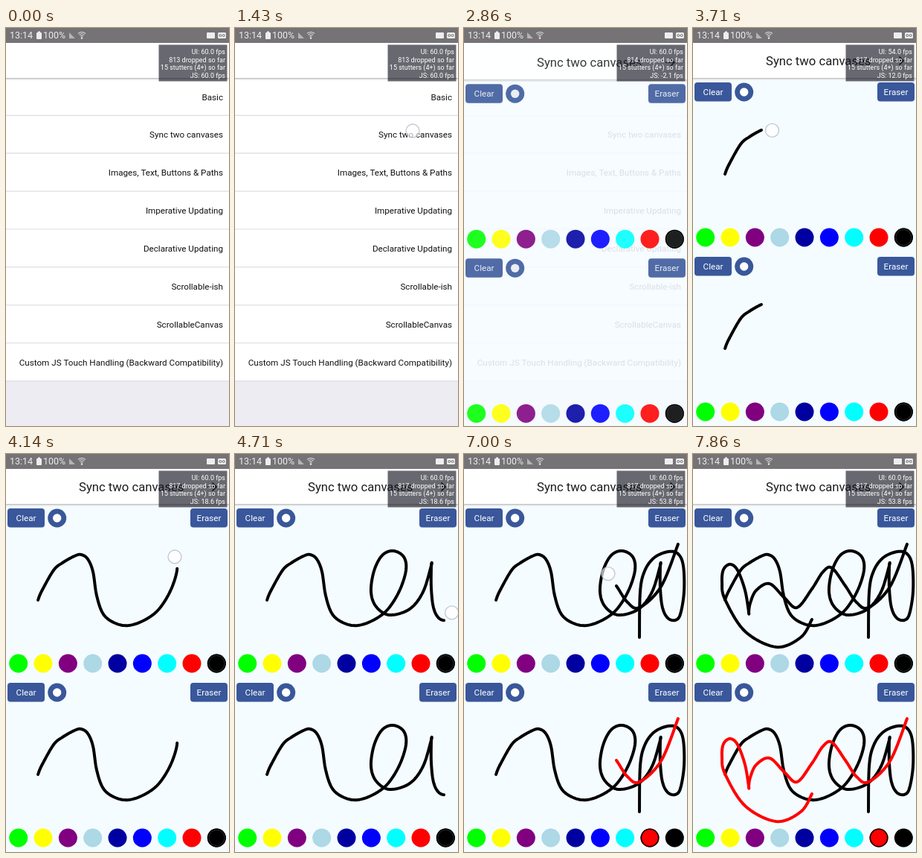
An HTML page with a canvas that plays this animation: 300x534 px, repeating every 8 s.

```html
<!DOCTYPE html>
<html lang="en">
<head>
<meta charset="utf-8">
<title>Sync two canvases</title>
<style>
  html, body { margin: 0; width: 100%; height: 100%; overflow: hidden; background: #fff; }
  canvas { display: block; width: 300px; height: 534px; }
</style>
</head>
<body>
<canvas id="stage"></canvas>
<script>
const W = 300, H = 534, LOOP = 8000, STEP = LOOP / 56, PANE = 234;
const canvas = document.getElementById('stage');
const ratio = window.devicePixelRatio || 1;
canvas.width = W * ratio;
canvas.height = H * ratio;
const ctx = canvas.getContext('2d');
ctx.scale(ratio, ratio);

const ROWS = ['Basic', 'Sync two canvases', 'Images, Text, Buttons & Paths', 'Imperative Updating',
  'Declarative Updating', 'Scrollable-ish', 'ScrollableCanvas',
  'Custom JS Touch Handling (Backward Compatibility)'];
const COLORS = ['#00ff00', '#ffff00', '#800080', '#add8e6', '#0000a0', '#0000ff', '#00ffff', '#ff0000', '#000000'];
const RED = 7, BLACK = 8;

// Repeated points make sharp corners.
const scribble = makeStroke(3575, 1566, [
  [43,196],[48,184],[64,156],[76,146],[92,137],[101,135],[110,141],[117,158],[122,190],[131,215],
  [147,227],[165,230],[186,223],[205,209],[221,184],[230,156],[227,138],[213,130],[198,136],[187,157],
  [183,185],[190,205],[208,216],[235,208],[253,185],[264,150],[264,150],[264,180],[267,206],[274,220],
  [284,223],[291,215],[296,185],[295,150],[288,134],[275,131],[256,139],[243,157],[237,185],[236,246]]);
const wave = makeStroke(6780, 950, [
  [288,121],[265,178],[236,206],[220,199],[205,177],[187,153],[175,158],[160,181],[140,206],[123,193],
  [103,174],[85,183],[77,200],[75,212],[75,212],[70,183],[60,156],[50,148],[41,155],[39,172],
  [43,195],[70,238],[112,259],[145,246],[160,222]]);

const clamp = v => Math.max(0, Math.min(1, v));

// Catmull-Rom spline sampled as [x, y, distance].
function makeStroke(start, duration, knots) {
  const points = [[...knots[0], 0]];
  for (let i = 0; i < knots.length - 1; i++) {
    const b = knots[i], c = knots[i + 1], a = knots[i - 1] || b, d = knots[i + 2] || c;
    for (let s = 1; s <= 10; s++) {
      const u = s / 10;
      const [x, y] = [0, 1].map(k => b[k] + u / 2 * (c[k] - a[k] +
        u * (2 * a[k] - 5 * b[k] + 4 * c[k] - d[k] + u * (3 * b[k] - a[k] - 3 * c[k] + d[k]))));
      const last = points[points.length - 1];
      points.push([x, y, last[2] + Math.hypot(x - last[0], y - last[1])]);
    }
  }
  return { start, duration, points, length: points[points.length - 1][2] };
}

function drawStroke(stroke, t, color, dy) {
  if (t < stroke.start) return;
  const reach = clamp((t - stroke.start) / stroke.duration) * stroke.length;
  ctx.beginPath();
  for (const [x, y, distance] of stroke.points) if (distance <= reach) ctx.lineTo(x, y + dy);
  ctx.strokeStyle = color;
  ctx.lineWidth = 4;
  ctx.lineCap = ctx.lineJoin = 'round';
  ctx.stroke();
}

function rect(x, y, w, h, color, radius = 0) {
  ctx.beginPath();
  ctx.roundRect(x, y, w, h, radius);
  ctx.fillStyle = color;
  ctx.fill();
}

function disc(x, y, r, color) {
  ctx.beginPath();
  ctx.arc(x, y, r, 0, 2 * Math.PI);
  ctx.fillStyle = color;
  ctx.fill();
}

function ring(x, y, r, color, width, from = 0, to = 2 * Math.PI) {
  ctx.beginPath();
  ctx.arc(x, y, r, from, to);
  ctx.strokeStyle = color;
  ctx.lineWidth = width;
  ctx.stroke();
}

function text(string, x, y, size, color, align = 'left') {
  ctx.font = `${size}px Roboto, sans-serif`;
  ctx.textAlign = align;
  ctx.fillStyle = color;
  ctx.fillText(string, x, y);
}

function withAlpha(alpha, draw) {
  ctx.save();
  ctx.globalAlpha *= alpha;
  draw();
  ctx.restore();
}

function drawHeader() {
  rect(0, 20, W, 47, '#fff');
  rect(0, 67, W, 1, '#bfc1c3');
  rect(0, 68, W, 1.5, '#dfe2e4');
}

function drawStatusBar() {
  const ink = '#eee';
  rect(0, 0, W, 20, '#757375');
  text('13:14', 5, 14, 12.5, ink);
  rect(41, 6, 7, 9, ink, 1);
  rect(43, 4.5, 3, 2, ink);
  text('100%', 50, 14, 12.4, ink);
  ctx.beginPath();
  ctx.moveTo(85, 6);
  ctx.lineTo(93, 14);
  ctx.lineTo(85, 14);
  ctx.fillStyle = '#b5b3b5';
  ctx.fill();
  for (const r of [2.5, 5, 7.5]) ring(102, 13, r, '#ddd', 1.1, -2.3, -0.84);
  disc(102, 13.5, 1.2, ink);
  rect(270, 6, 11, 8, ink, 1);
  rect(285, 6, 11, 8, ink, 1.5);
  ring(288.3, 10, 1.5, '#757375', 1);
  ring(292.7, 10, 1.5, '#757375', 1);
}

function drawList(t) {
  rect(0, 20, W, H, '#edecf3');
  ROWS.forEach((label, i) => {
    const fade = i === 1 && t >= 1500 ? 0.3 + 0.7 * clamp((t - 1650) / 400) : 1;
    const y = 67 + i * 50.9;
    withAlpha(fade, () => {
      rect(0, y, W, 49.7, '#fff');
      text(label, 292, 96.5 + i * 50.9, 11.67, '#111', 'right');
    });
    rect(0, y + 49.7, W, 1.2, '#dfdfe3');
  });
  drawHeader();
}

function button(label, x, y) {
  rect(x, y, 50, 25.5, '#39579a', 4);
  text(label, x + 25, y + 17, 11.67, '#fff', 'center');
}

function drawPane(dy, selected, press) {
  button('Clear', 2, 73 + dy);
  disc(68.7, 86 + dy, 12.5, '#39579a');
  disc(68.7, 86 + dy, 5.7, '#fff');
  button('Eraser', 248, 73 + dy);
  COLORS.forEach((color, i) => {
    const x = 16.7 + i * 33.33, y = 281 + dy;
    withAlpha(i === RED ? press : 1, () => {
      disc(x, y, 12.5, color);
      if (i === selected) {
        ring(x, y, 11.7, '#000', 1.6);
        if (i === BLACK) ring(x, y, 10.6, '#3a3d3f', 0.7);
      }
    });
  });
}

function drawSketch(t) {
  const redChosen = t >= 5950;
  const press = redChosen ? 0.2 + 0.8 * clamp((t - 6010) / 300) : 1;
  rect(0, 20, W, H, '#f5fcff');
  drawHeader();
  text('Sync two canvases', 98, 50, 16.67, '#1c1c1c');
  ctx.beginPath();
  ctx.moveTo(271, 44);
  ctx.lineTo(283, 44);
  ctx.moveTo(277.5, 38.5);
  ctx.lineTo(283, 44);
  ctx.lineTo(277.5, 49.5);
  ctx.strokeStyle = '#222';
  ctx.lineWidth = 1.7;
  ctx.stroke();
  drawPane(0, BLACK, 1);
  drawPane(PANE, redChosen ? RED : BLACK, press);
  for (const dy of [0, PANE]) {
    drawStroke(scribble, t, '#000', dy);
    drawStroke(wave, t, dy ? '#ff0000' : '#000', dy);
  }
}

function drawMonitor(t) {
  const [ui, dropped, js] =
    t < 2800 ? ['60.0', 813, '60.0'] :
    t < 3100 ? ['60.0', 814, '-2.1'] :
    t < 4100 ? ['54.0', 817, '12.0'] :
    t < 5100 ? ['60.0', 817, '18.6'] : ['60.0', 817, '53.8'];
  rect(205.5, 22.5, 92, 49, 'rgba(20,20,32,.64)');
  [`UI: ${ui} fps`, `${dropped} dropped so far`, '15 stutters (4+) so far', `JS: ${js} fps`]
    .forEach((line, i) => text(line, 295, 35.3 + i * 10.4, 9, '#fff', 'right'));
}

// The finger runs slightly ahead of the ink.
function touchPoint(t) {
  if (t > 1400 && t < 1650) return [239, 138];
  if (t > 5800 && t < 5950) return [250, 515];
  for (const { start, duration, points, length } of [scribble, wave]) {
    const progress = (t - start) / duration;
    if (progress < -0.08 || progress > 1) continue;
    const ahead = progress < 0 ? 0 : progress * length + 15;
    return points.find(p => p[2] >= ahead) || points[points.length - 1];
  }
}

function render(t) {
  if (t < 3000 - 5) drawList(t);
  if (t > 2800) {
    const settled = t > 2990;
    ctx.save();
    ctx.translate(0, settled ? 0 : 2.2);
    withAlpha(settled ? 1 : 0.88, () => drawSketch(t));
    ctx.restore();
  }
  drawStatusBar();
  drawMonitor(t);
  const touch = touchPoint(t);
  if (touch) {
    disc(touch[0], touch[1], 9.5, 'rgba(255,255,255,.65)');
    ring(touch[0], touch[1], 9, 'rgba(160,165,185,.6)', 1.4);
  }
}

const begin = performance.now();
function tick() {
  const t = (performance.now() - begin) % LOOP;
  render(Math.floor((t + 5) / STEP) % 56 * STEP);
  requestAnimationFrame(tick);
}
tick();
</script>
</body>
</html>
```
